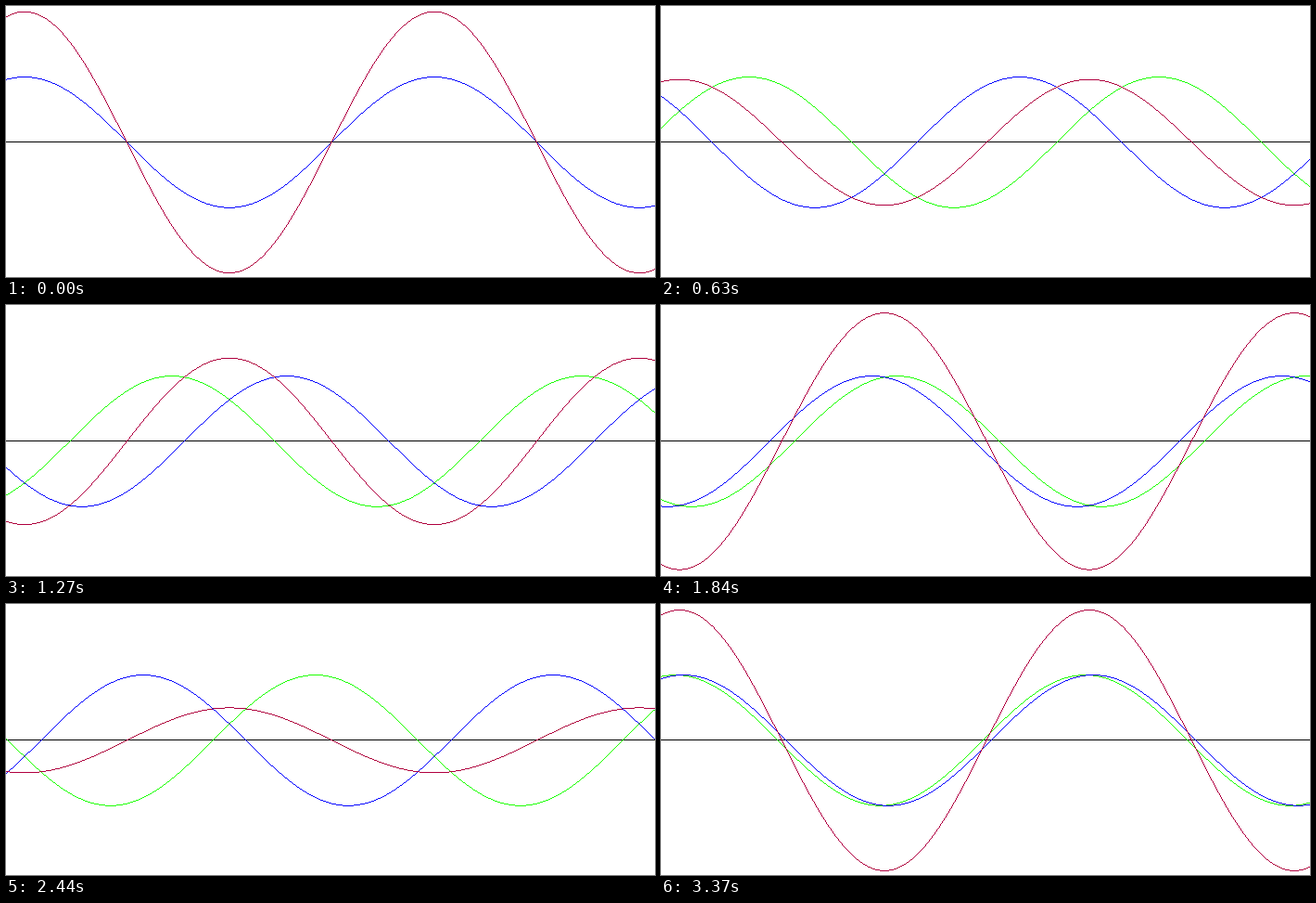
Write a matplotlib script that moves like this. It is 700 by 292 pixels and loops after 3400 ms.

```python
"""Standing wave as the sum of two waves travelling in opposite directions."""
import numpy as np
import matplotlib.pyplot as plt
from matplotlib.animation import FuncAnimation

WIDTH, HEIGHT, DPI = 700, 292, 100
TICK, LOOP = 10, 3400          # ms
PHASES = 100                   # poses in one period
HOLD = 100                     # ms the first pose stays

UNIT = 70.35                   # pixels per radian and per unit of amplitude
X0, Y0 = 351, 146.9            # node and axis position in pixels

WHITE = (255, 255, 255)
BLACK = (0, 0, 0)
GREEN = (30, 255, 0)
BLUE = (0, 0, 255)
RED = (176, 0, 64)

columns = np.arange(WIDTH)
angle = (np.arange(WIDTH + 1) - X0) / UNIT


def pose_at(ms):
    """Index of the pose on show; a pose lasts 100/3 ms, rounded to ticks."""
    lead = 4 if ms < LOOP / 2 else 0
    return max(0, 1 + (ms + lead - HOLD) * 3 // 100)


def trace(canvas, wave, color):
    """Draw a curve one pixel thick, joining neighbouring columns."""
    rows = np.floor(Y0 - UNIT * wave).astype(int)
    rise = np.diff(rows)
    gap = np.maximum(np.abs(rise) - 1, 0)
    for step in range(gap.max() + 1):
        canvas[rows[:-1] + np.sign(rise) * np.minimum(step, gap), columns] = color


def render(pose):
    phase = 2 * np.pi * pose / PHASES
    rightward = np.sin(angle - phase)
    leftward = np.sin(angle + phase)
    canvas = np.full((HEIGHT, WIDTH, 3), WHITE, dtype=np.uint8)
    canvas[int(Y0)] = BLACK
    trace(canvas, rightward, GREEN)
    trace(canvas, leftward, BLUE)
    trace(canvas, rightward + leftward, RED)
    return canvas


plt.rcParams["savefig.dpi"] = DPI
fig = plt.figure(figsize=(WIDTH / DPI, HEIGHT / DPI), dpi=DPI, facecolor="white")
picture = fig.figimage(render(0), origin="upper")


def update(tick):
    picture.set_data(render(pose_at(tick * TICK)))
    return [picture]


anim = FuncAnimation(fig, update, frames=LOOP // TICK, interval=TICK,
                     repeat=True, repeat_delay=0, cache_frame_data=False)
plt.show()
```
